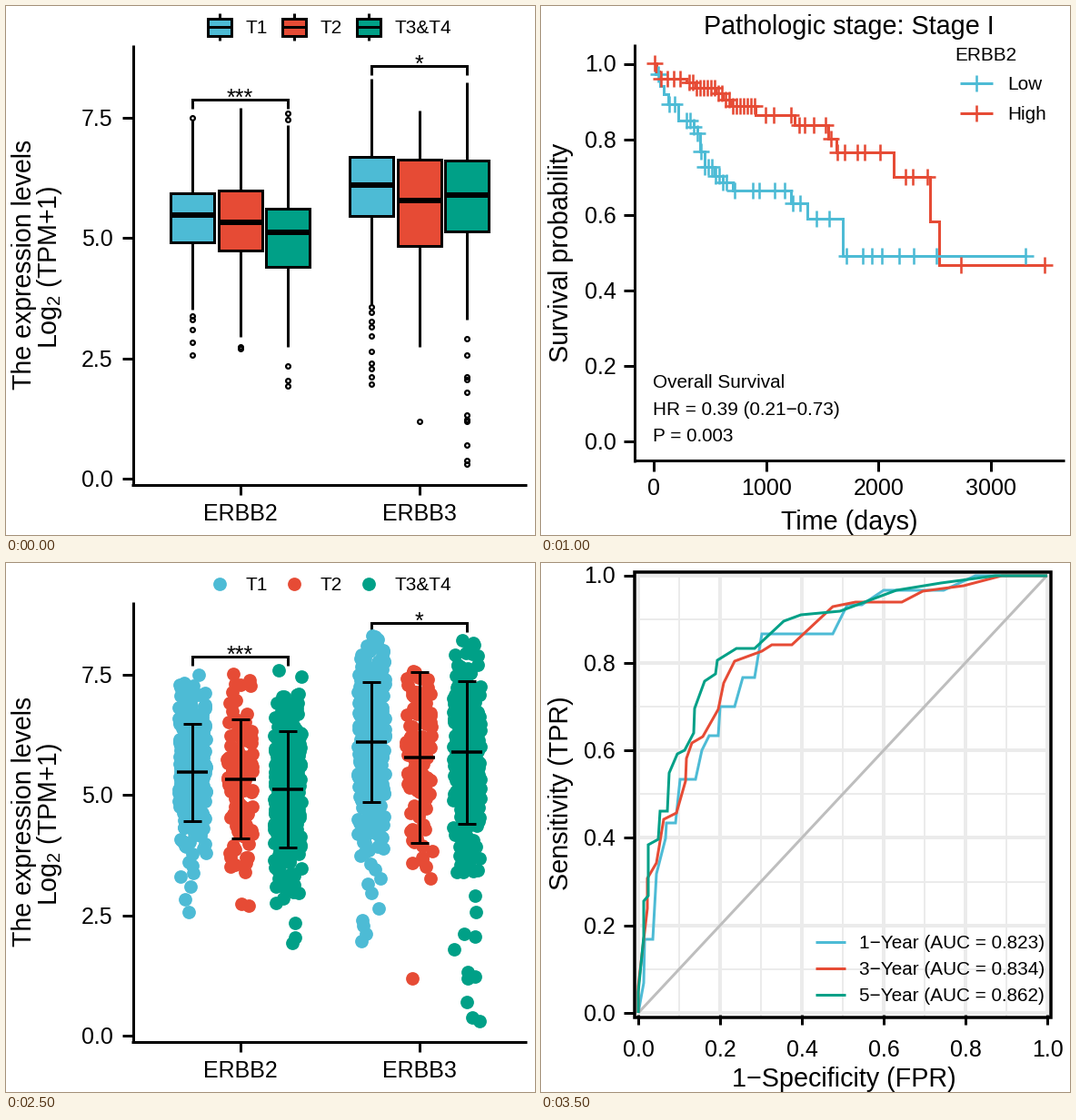
These frames come from a looping animation (582x582 px, 4 s). A matplotlib script:

```python
import numpy as np
import matplotlib.pyplot as plt
from matplotlib.animation import FuncAnimation
from matplotlib.patches import Rectangle

SIZE = 582
PT = 0.75  # points per pixel at 96 dpi
BLUE, RED, GREEN = COLORS = ("#4DBBD5", "#E64B35", "#00A087")
STAGES = ("T1", "T2", "T3&T4")
FIFTHS = np.arange(6) / 5

plt.rcParams["font.family"] = "Liberation Sans"
plt.rcParams["mathtext.default"] = "regular"

fig = plt.figure(figsize=(SIZE / 96, SIZE / 96), dpi=96, facecolor="white")
ax = fig.add_axes([0, 0, 1, 1])


# ---------- drawing helpers, all in pixels ----------
def line(xs, ys, color="black", width=3, z=2, **kw):
    ax.plot(xs, ys, color=color, lw=width * PT, zorder=z,
            solid_capstyle="butt", solid_joinstyle="miter", **kw)


def text(x, y, s, size=25, ha="center", rot=0):
    ax.text(x, y, s, fontsize=size * PT, ha=ha, va="baseline", rotation=rot,
            rotation_mode="anchor", zorder=9)


def small(x, y, s):
    text(x, y, s, 20.8, ha="left")


def rect(x0, y0, x1, y1, face="none", width=3, z=2):
    ax.add_patch(Rectangle((x0, y0), x1 - x0, y1 - y0, facecolor=face,
                           edgecolor="black", lw=width * PT, zorder=z))


def dots(xs, ys, radius, face, edge="none", width=0.0, z=2):
    ax.scatter(xs, ys, s=(2 * radius * PT) ** 2, c=[face], edgecolors=[edge],
               linewidths=width * PT, zorder=z)


def y_ticks(x, right, values, to_y, fmt="{:.1f}"):
    for v in values:
        line([x, x + 11], [to_y(v)] * 2)
        text(right, to_y(v) + 9, fmt.format(v), ha="right")


def x_ticks(y, base, xs, labels):
    for x, s in zip(xs, labels):
        line([x, x], [y, y + 11])
        text(x, base, s)


def bracket(x0, x1, y, drop, stars, base):
    line([x0, x0, x1, x1], [y + drop, y, y, y + drop])
    text((x0 + x1) / 2, base, stars)


def box(x, half, top, mid, low, hi, lo, face, z=2):
    line([x, x], [hi, top], z=z)
    line([x, x], [low, lo], z=z)
    rect(x - half, top, x + half, low, face, z=z)
    line([x - half, x + half], [mid, mid], width=6, z=z + 0.1)


def tint(color, alpha):
    return tuple(int(color[i:i + 2], 16) / 255 for i in (1, 3, 5)) + (alpha,)


def wide_y(y):
    """Height in the violin chart for a height in the grouped charts."""
    return 598.4 - 67.9 * (520 - np.asarray(y)) / 52.95


# ---------- expression data ----------
# box top, median, box bottom, whisker ends, half error bar, outliers
GROUPS = (
    (206, 230, 259.5, 126, 334, 53.5, (123, 341, 345, 356, 370, 384)),
    (203, 237.5, 269, 112, 364, 65.5, (375, 377)),
    (223, 249, 287, 131, 375, 64, (118, 125, 396, 412, 418)),
    (165.5, 197, 231, 80, 328, 66, (331, 337, 347, 353, 363, 380, 393, 399, 408, 416)),
    (169, 213.5, 263.5, 115, 375, 94, (457,)),
    (169.5, 208, 248, 84, 345, 78.5,
     (366, 384, 408, 411, 425, 450, 455, 457, 483, 500, 504)),
)
COUNTS = (280, 105, 290)


def group_x(i):
    return 205 + 52.5 * (i % 3) + 197 * (i // 3)


def make_cloud(i):
    _, mid, _, hi, lo, spread, far = GROUPS[i]
    rng = np.random.default_rng(20 + i)
    n = COUNTS[i % 3]
    ys = rng.normal(mid, min(0.93 * spread, 68), 3 * n)
    ys = np.append(ys[(ys > hi) & (ys < lo)][:n], far)
    return rng.uniform(-15, 15, len(ys)), ys, rng.uniform(-43, 43, len(ys))


POINTS = [make_cloud(i) for i in range(6)]


def expression_axes():
    line([139.5, 139.5], [43, 528])
    line([138, 573], [526.5, 526.5])
    y_ticks(128, 117.5, (0, 2.5, 5, 7.5), lambda v: 520 - 52.95 * v)
    x_ticks(527, 566.5, (257.5, 454.5), ("ERBB2", "ERBB3"))
    text(28, 284, "The expression levels", 28.5, rot=90)
    text(56, 287, "Log$_{2}$ (TPM+1)", 28.5, rot=90)
    bracket(205, 310, 102.5, 10, "***", 108.5)
    bracket(402, 507, 65.5, 10, "*", 72)
    for i, s in enumerate(STAGES):
        small(264 + 82 * i, 30, s)


def box_chart():
    expression_axes()
    for i, (*stats, _, far) in enumerate(GROUPS):
        x = group_x(i)
        box(x, 24, *stats, COLORS[i % 3])
        dots([x] * len(far), far, 2.4, "none", "black", 2.2)
    for i, c in enumerate(COLORS):
        x = 235 + 82 * i
        line([x, x], [8, 38])
        rect(x - 13, 13.5, x + 13, 32.5, c)
        line([x - 13, x + 13], [23, 23])


def dot_chart():
    expression_axes()
    for i, (_, mid, _, _, _, spread, _) in enumerate(GROUPS):
        x = group_x(i)
        near, ys, _ = POINTS[i]
        dots(x + near, ys, 7.4, COLORS[i % 3])
        line([x, x], [mid - spread, mid + spread], z=3)
        line([x - 17, x + 17], [mid, mid], width=3.5, z=3)
        for y in (mid - spread, mid + spread):
            line([x - 10, x + 10], [y, y], z=3)
    for i, c in enumerate(COLORS):
        dots([235 + 82 * i], [23], 7.4, c)


def violin(x, data, half, color):
    """Outline from a Gaussian density estimate, cut at the data's ends."""
    ys = np.linspace(data.min(), data.max(), 200)
    band = 0.9 * data.std() * len(data) ** -0.2
    w = np.exp(-((ys[:, None] - data) / band) ** 2 / 2).sum(axis=1)
    w = np.maximum(half * w / w.max(), 2)
    ax.fill(np.r_[x - w, (x + w)[::-1]], np.r_[ys, ys[::-1]],
            facecolor=tint(color, 0.5), edgecolor="black", lw=3 * PT, zorder=2)


def violin_chart():
    line([119.5, 119.5], [43, 490])
    line([118, 573], [488.5, 488.5])
    y_ticks(108, 97, (2, 4, 6, 8), lambda v: 598.4 - 67.9 * v, "{}")
    x_ticks(489, 527.5, (204, 346, 488), STAGES)
    text(345, 563, "T stage", 28.5)
    text(28, 266, "The expression of ERBB2", 28.5, rot=90)
    text(56, 266, "Log$_{2}$ (TPM+1)", 28.5, rot=90)
    bracket(204, 488, 64, 9, "***", 69.5)
    for i, (color, half) in enumerate(zip(COLORS, (57, 45, 49))):
        x = 204 + 142 * i
        soft = tint(color, 0.5)
        _, ys, wide = POINTS[i]
        ys = wide_y(ys)
        violin(x, ys, half, color)
        box(x, 57, *wide_y(GROUPS[i][:5]), soft, z=3)
        dots(x + wide, ys, 5.5, tint(color, 0.33), tint(color, 0.42), 1.5, z=5)
        k = 225.5 + 82 * i
        rect(k - 16, 7, k + 16, 39, soft)
        line([k, k], [8, 38])
        rect(k - 13, 14, k + 13, 32, soft)
        line([k - 13, k + 13], [23, 23], width=4)
        small(k + 29.5, 30, STAGES[i])


# ---------- survival curves ----------
LOW = ((124, 63), (126, 75), (131, 88), (135, 97), (140, 108), (151, 126),
       (168, 133), (172, 140), (175, 160), (180, 177), (191, 187), (200, 194),
       (211, 203), (275, 217), (293, 234), (332, 275), (534, 275))
HIGH = ((124, 63), (127, 72), (130, 80), (160, 84), (170, 90), (192, 96),
        (200, 103), (209, 110), (236, 120), (279, 131), (316, 146), (325, 161),
        (388, 188), (428, 237), (438, 285), (555, 285))
LOW_MARKS = np.r_[129, 141, 147, 160:206:4, 213, 233, 240, 257, 268, 277, 285, 303,
                  317, 336, 354, 364, 375, 394, 410, 435, 533]
HIGH_MARKS = np.r_[125:160:7, 163:236:4, 247, 256, 275, 284, 290, 300, 313, 319,
                   326, 334, 348, 356, 373, 401, 409, 425, 462, 554]


def plus(xs, ys, color):
    ax.plot(xs, ys, "+", color=color, ms=18 * PT, mew=2.6 * PT, zorder=3)


def survival(points, marks, color, scale):
    xs, ys = np.array(points, float).T
    ys = 63 + (ys - 63) * scale
    line(xs, ys, color, drawstyle="steps-post")
    plus(marks, ys[np.searchsorted(xs, marks, "right") - 1], color)


def survival_chart(stage, ratio, p, low=1.0, high=1.0):
    line([103, 103], [42, 501.5])
    line([101.5, 576], [500, 500])
    y_ticks(91, 82.5, FIFTHS, lambda v: 479 - 415.5 * v)
    x_ticks(501, 538, 124 + 123.7 * np.arange(4), ("0", "1000", "2000", "3000"))
    text(339, 31, "Pathologic stage: Stage " + stage, 28.8)
    text(339, 576, "Time (days)", 28.8)
    text(30, 271, "Survival probability", 28.8, rot=90)
    survival(LOW, LOW_MARKS, BLUE, low)
    survival(HIGH, HIGH_MARKS, RED, high)
    small(123, 420, "Overall Survival")
    small(123, 450, "HR = " + ratio)
    small(123, 479, "P = " + p)
    small(455, 60, "ERBB2")
    for y, s, c in ((85, "Low", BLUE), (117.5, "High", RED)):
        line([461, 497], [y, y], c)
        plus([479], [y], c)
        small(513, y + 7.5, s)


# ---------- ROC curves ----------
ROC_A = ((109, 292), (121, 209), (128, 159), (140, 140), (146, 116), (159, 82),
         (178, 76), (216, 50), (250, 44), (311, 34), (368, 27), (463, 19),
         (540, 16), (564, 16))
ROC_B = ((109, 453), (115, 278), (122, 260), (128, 258), (134, 226), (140, 205),
         (159, 191), (185, 183), (203, 166), (229, 157), (255, 143), (292, 138),
         (305, 129), (337, 121), (431, 109), (490, 93), (545, 80), (558, 63),
         (564, 61))


def stairs(points, color):
    xs = np.linspace(109, 564, 74)
    ys = np.interp(xs, *zip(*points))
    line(np.r_[109, xs], np.r_[488, ys], color, drawstyle="steps-post")


def roc_axes(x0, y0, w, h, label_x, base, names):
    """Ticks and titles of a chart whose origin is (x0, y0)."""
    y_ticks(label_x, 82, FIFTHS, lambda v: y0 - h * v)
    x_ticks(y0 + 2, base, x0 + w * FIFTHS, [f"{v:.1f}" for v in FIFTHS])
    text(333, names[1], names[0], 28.7)
    text(names[2], 253, "Sensitivity (TPR)", 28.7, rot=90)


def roc_chart():
    rect(104.5, 11.5, 565, 488.5)
    roc_axes(109, 488.5, 455, 472.5, 93, 527.5, ("1-Specificity (FPR)", 563, 28))
    rows = ((ROC_A, BLUE, "ERBB2 (AUC: 0.927)"), (ROC_B, RED, "ERBB3 (AUC: 0.739)"))
    for i, (points, c, label) in enumerate(rows):
        y = 430 + 30 * i
        stairs(points, c)
        line([323, 346], [y, y], c)
        small(354, y + 7, label)
    line([109, 564], [488.5, 16], "#999999")


YEAR_1 = ((107, 495), (113, 462), (114, 414), (123, 414), (127, 342), (137, 303),
          (138, 286), (148, 286), (153, 238), (170, 238), (177, 206), (185, 190),
          (195, 190), (197, 158), (213, 158), (222, 126), (235, 126), (243, 78),
          (321, 78), (337, 46), (353, 46), (377, 30), (443, 30), (478, 14))
YEAR_3 = ((107, 466), (117, 380), (117, 347), (127, 330), (135, 282), (149, 275),
          (159, 240), (160, 215), (166, 198), (178, 191), (195, 161), (201, 132),
          (213, 108), (243, 97), (254, 90), (276, 90), (321, 48), (346, 43),
          (397, 43), (420, 31), (465, 25), (507, 14))
YEAR_5 = ((107, 472), (113, 411), (113, 372), (118, 366), (118, 310), (129, 304),
          (131, 273), (139, 273), (141, 231), (150, 210), (158, 206), (168, 187),
          (169, 160), (180, 130), (192, 122), (194, 107), (215, 94), (235, 94),
          (267, 64), (286, 57), (329, 53), (391, 30), (440, 22), (500, 14))


def yearly_chart():
    for i in range(11):
        x, y = 107 + 45 * i, 495 - 48.15 * i
        w = 2 if i % 2 else 4
        line([x, x], [9, 500], "#EBEBEB", w, z=1)
        line([103, 561], [y, y], "#EBEBEB", w, z=1)
    rect(103, 9.5, 561, 500, width=3.5, z=4)
    roc_axes(107, 495, 450, 481.5, 91, 543, ("1−Specificity (FPR)", 576, 30))
    line([107, 557], [495, 13.5], "#BEBEBE")
    rows = ((YEAR_1, "1−Year (AUC = 0.823)"), (YEAR_3, "3−Year (AUC = 0.834)"),
            (YEAR_5, "5−Year (AUC = 0.862)"))
    for i, (points, label) in enumerate(rows):
        y = 417 + 29 * i
        line(*zip((107, 495), *points, (557, 14)), COLORS[i])
        line([302, 335], [y, y], COLORS[i])
        small(350, y + 7, label)


SCENES = (
    box_chart,
    yearly_chart,
    lambda: survival_chart("I", "0.39 (0.21−0.73)", "0.003"),
    lambda: survival_chart("II", "0.58 (0.34−0.97)", "0.039", 0.9, 1.12),
    roc_chart,
    dot_chart,
    violin_chart,
    yearly_chart,
)


def draw(i):
    ax.clear()
    ax.set_xlim(0, SIZE)
    ax.set_ylim(SIZE, 0)
    ax.axis("off")
    SCENES[i % len(SCENES)]()
    return []


anim = FuncAnimation(fig, draw, frames=len(SCENES), init_func=lambda: draw(0),
                     interval=500, repeat=True, repeat_delay=0, blit=False)
plt.show()
```
